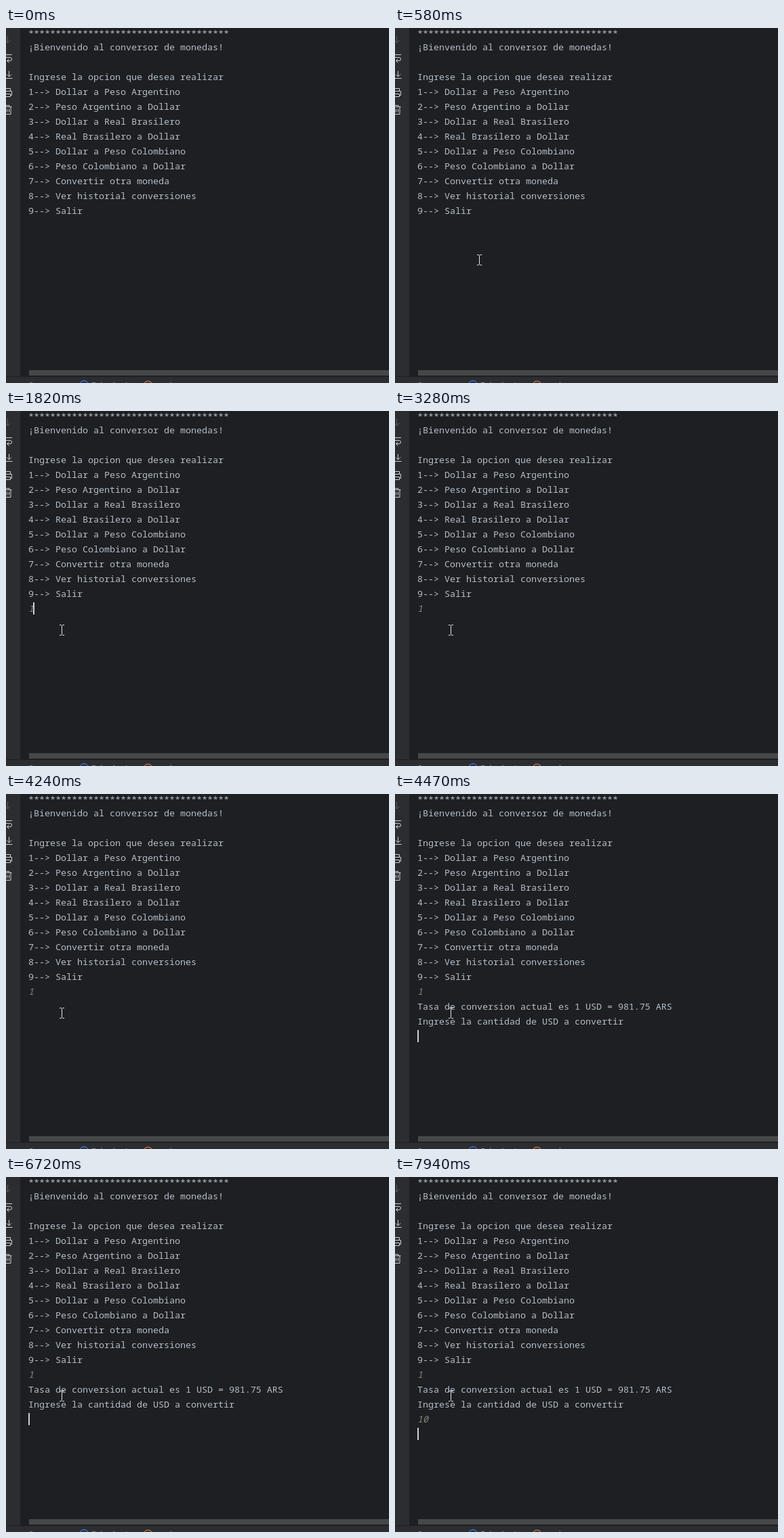
An HTML page for the animation above (8000 ms loop, 565 by 525 pixels).

```html
<!DOCTYPE html>
<html lang="es">
<head>
<meta charset="utf-8">
<title>Conversor de monedas</title>
<style>
  html, body { margin: 0; width: 100%; height: 100%; overflow: hidden; background: #1e1f22; }
  svg { display: block; }
  .console text { font: 13.333px "Noto Sans Mono", "DejaVu Sans Mono", monospace; fill: #b4bec9; white-space: pre; font-variant-ligatures: none; }
  .console .input { font-style: italic; fill: #768c78; }
  .path text { font: 13px Inter, "Open Sans", sans-serif; fill: #8b8e95; }
  .icons { fill: none; stroke: #ced0d6; stroke-width: 1; }
</style>
</head>
<body>
<svg width="565" height="525" viewBox="0 0 565 525">
  <rect width="565" height="525" fill="#1e1f22"/>
  <rect width="21" height="515" fill="#2b2d30"/>
  <g class="icons">
    <path d="M2.5 11.5V22M-1.5 18l4 4 4-4" stroke="#5a5d63"/>
    <path d="M-2 39.5H9M-2 43.5H6a2.5 2.5 0 0 1 0 5H2M4.5 45.5L1.5 48.5l3 3"/>
    <path d="M4.5 63.5V72M1 68.5l3.5 3.5L8 68.5M-1 74.5H9.5"/>
    <path d="M-1 93V89.5H6.500V93M-1 93.5H8.5V99.5H6.5M-1 97.5H6.5V101.5H-1"/>
    <path d="M-1 116.5H8.5M-1 114.5H5V116.500M7 116.5V127.5H-1M1.5 119.5v5M4.5 119.5v5"/>
  </g>
  <rect x="34" y="506" width="531" height="8" fill="#464749"/>
  <g class="path">
    <rect y="516" width="565" height="9" fill="#2b2d30"/>
    <text x="32" y="534">Conversor</text>
    <circle cx="115" cy="528" r="6.5" fill="#25324d" stroke="#548af7"/>
    <text x="126" y="534">Principal</text>
    <circle cx="209.5" cy="528.5" r="6.5" fill="#45322b" stroke="#e08855"/>
    <text x="223" y="534">main</text>
  </g>
  <g class="console" id="console"></g>
  <rect id="caret" width="2" height="18" fill="#ced0d6"/>
  <g id="pointer">
    <circle id="click" cx="-2.5" cy="-1" r="12" fill="#8f8b12"/>
    <path d="M-3.5 -7.5h2.5l1 1 1-1h2.5M0 -6.5V6.5M-3.5 7.5h2.5l1-1 1 1h2.5" fill="none" stroke="#e2e4e8"/>
  </g>
</svg>
<script>
const LOOP = 8000, LEFT = 33, CHAR = 8, ROW = 22, BASE = 11;
const $ = id => document.getElementById(id);
const show = (el, on) => el.setAttribute("visibility", on ? "visible" : "hidden");

function addLine(row, text, className = "", dy = 0) {
  const el = document.createElementNS("http://www.w3.org/2000/svg", "text");
  el.setAttribute("x", LEFT);
  el.setAttribute("y", BASE + row * ROW + dy);
  el.setAttribute("class", className);
  el.textContent = text;
  $("console").append(el);
  return el;
}

addLine(0, "*".repeat(37), "", 2);
[
  "¡Bienvenido al conversor de monedas!",
  "",
  "Ingrese la opcion que desea realizar",
  "1--> Dollar a Peso Argentino",
  "2--> Peso Argentino a Dollar",
  "3--> Dollar a Real Brasilero",
  "4--> Real Brasilero a Dollar",
  "5--> Dollar a Peso Colombiano",
  "6--> Peso Colombiano a Dollar",
  "7--> Convertir otra moneda",
  "8--> Ver historial conversiones",
  "9--> Salir"
].forEach((text, i) => addLine(i + 1, text));

const option = addLine(13, "1", "input");
const reply = [
  addLine(14, "Tasa de conversion actual es 1 USD = 981.75 ARS"),
  addLine(15, "Ingrese la cantidad de USD a convertir")
];
const amount = addLine(16, "", "input");

// Caret: start time, row, column; no row means blinked off
const carets = [
  [0], [800, 13, 0], [1300], [1790, 13, 0], [1820, 13, 1],
  [2730, 14, 0], [3280], [3760, 14, 0], [4240],
  [4470, 16, 0], [5220], [5740, 16, 0], [6220], [6720, 16, 0],
  [6880, 16, 1], [6990, 16, 2], [7700], [7940, 17, 0]
];

function pointerAt(t) {
  if (t < 560) {
    const s = Math.min(1, (Math.floor((t - 170) / 20) + 1) / 5);
    const left = (1 - s) ** 1.4 / 0.8 ** 1.4;
    return [131.5 + 366 * left, 337 + 182 * left];
  }
  const s = Math.min(1, (Math.floor((t - 560) / 27) + 1) / 7);
  const bend = (a, b, c) => a * (1 - s) ** 2 + 2 * b * s * (1 - s) + c * s * s;
  return [bend(131.5, 108, 82.5), bend(337, 362, 324)];
}

function draw(t) {
  const [, row, col] = carets.findLast(c => c[0] <= t);
  show($("caret"), row !== undefined);
  if (row !== undefined) {
    $("caret").setAttribute("x", LEFT + col * CHAR - (col > 0));
    $("caret").setAttribute("y", row * ROW - 3);
  }
  show(option, t >= 1820);
  reply.forEach(line => show(line, t >= 4470));
  amount.textContent = t >= 6990 ? "10" : t >= 6880 ? "1" : "";

  show($("pointer"), t >= 170);
  show($("click"), t >= 740 && t < 830);
  const [x, y] = pointerAt(t);
  $("pointer").setAttribute("transform", `translate(${Math.floor(x) + 0.5} ${Math.round(y)})`);
}

const start = performance.now();
function tick() {
  draw((performance.now() - start) % LOOP);
  requestAnimationFrame(tick);
}
tick();
</script>
</body>
</html>
```
